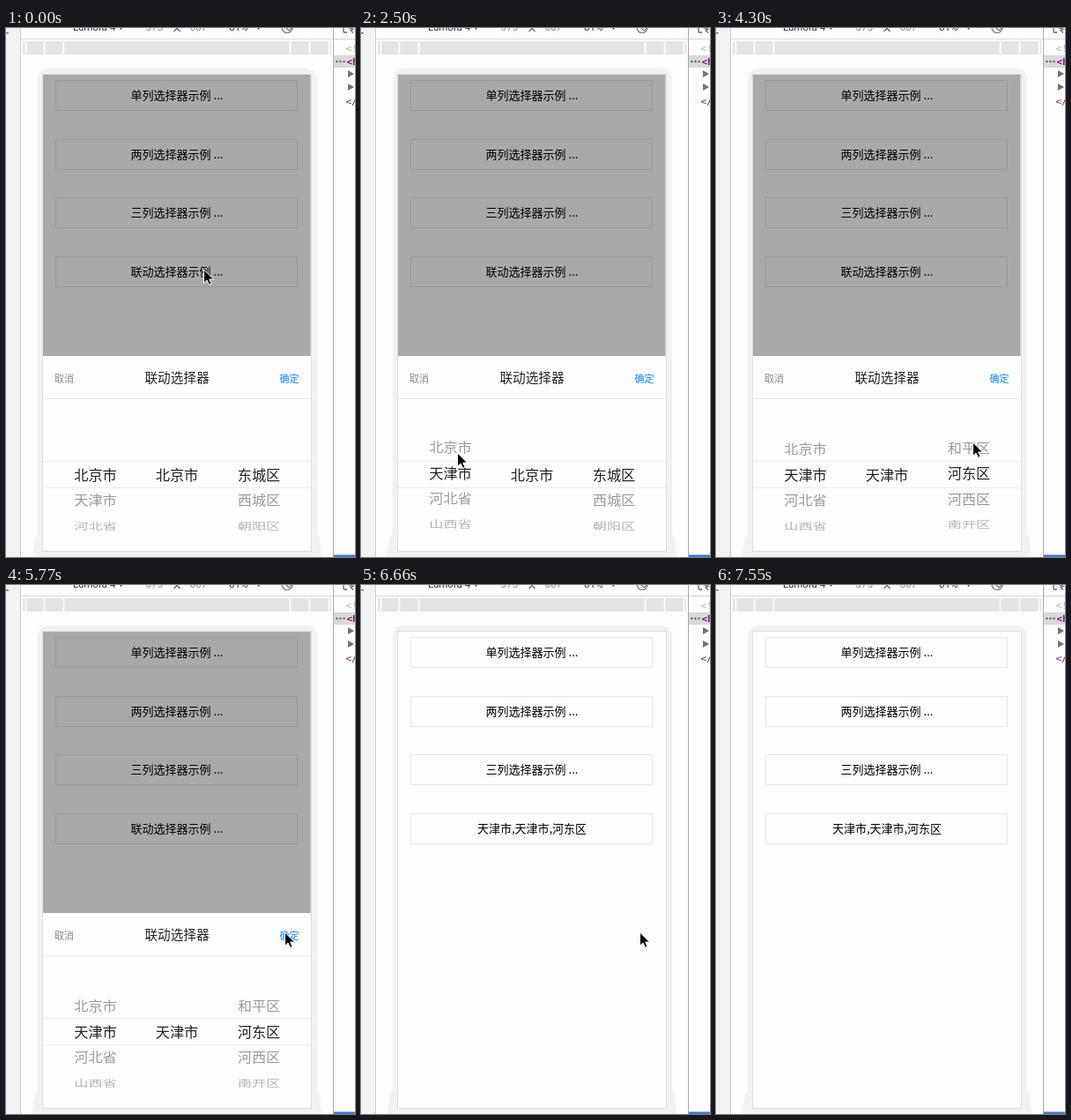
An HTML page for the animation above (8000 ms loop, 396x600 px).

```html
<!DOCTYPE html>
<html lang="zh">
<head>
<meta charset="utf-8">
<title>Linked picker</title>
<style>
  html, body { margin: 0; width: 100%; height: 100%; overflow: hidden; background: #fdfdfd; }
  svg { display: block; font-family: "Noto Sans CJK SC", "Noto Sans CJK", sans-serif; }
  .mid { text-anchor: middle; }
  .label { font-size: 13px; fill: #000; }
  .small { font-size: 11px; }
  .item { font-size: 16.2px; }
  .bar { font: 11.5px Roboto, "Open Sans", sans-serif; fill: #333; }
  .code { font: 11px "DejaVu Sans Mono", monospace; }
</style>
</head>
<body>
<svg id="stage" width="396" height="600" viewBox="0 0 396 600">
  <clipPath id="screen"><rect x="42" y="53" width="304" height="540"/></clipPath>
  <rect width="396" height="600" fill="#fdfdfd"/>

  <!-- browser tool bar and side panels -->
  <rect width="16" height="600" fill="#f1f3f3"/>
  <rect x="16" width="1" height="600" fill="#c8c8c8"/>
  <rect y="5" width="3" height="1.5" fill="#777"/>
  <rect x="17" y="12" width="354" height="1" fill="#dcdcdc"/>
  <g class="bar">
    <text x="76" y="3">Lumora 4</text>
    <path d="M128-2h5l-2.500 4z"/>
    <text x="158.500" y="3" fill="#888">375</text>
    <path d="M190.500-3l7 7m0-7l-7 7" stroke="#666" stroke-width="1.300"/>
    <text x="208.500" y="3" fill="#888">667</text>
    <text x="253" y="3">81%</text>
    <path d="M284-2h5l-2.500 4z"/>
    <g fill="none" stroke="#777" stroke-width="1.200">
      <circle cx="319" cy="-.5" r="6"/>
      <path d="M315-3l3-3 6 6-3 3z"/>
    </g>
  </g>
  <rect x="19" y="15" width="350" height="15" fill="#e4e4e4"/>
  <path d="M22.500 15v15M43.500 15v15M65.500 15v15M322.500 15v15M344.500 15v15M366.500 15v15" stroke="#fff" stroke-width="1.500"/>

  <!-- device -->
  <path d="M36 60q0-14 14-14H339q14 0 14 14V574l3 4 1 12 1 10H30l1-10 2-12 3-4z" fill="#f2f2f2"/>
  <rect x="41.500" y="52.500" width="305" height="541" fill="#fdfdfd" stroke="#dedede"/>
  <g id="buttons"></g>

  <g clip-path="url(#screen)">
    <rect id="mask" x="42" y="53" width="303.500" height="540" fill="#000006" fill-opacity=".335"/>
    <g id="sheet">
      <rect x="42" y="372" width="304" height="222" fill="#fdfdfd"/>
      <path d="M42 420.500h304M42 491.500h304M42 521.500h304" stroke="#ededed"/>
      <text class="small" x="55" y="402" fill="#888">取消</text>
      <text class="mid" x="194" y="402" font-size="14.600" fill="#222">联动选择器</text>
      <text class="small" x="310.500" y="402" fill="#0a84ff">确定</text>
      <g id="wheels"></g>
    </g>
  </g>

  <!-- markup panel -->
  <rect x="371" width="1" height="600" fill="#ababab"/>
  <rect x="372" y="12" width="24" height="1" fill="#d4d4d4"/>
  <path d="M383 0v4q0 1 1 1h3M387-1l7 2.500-3 1 3 3" fill="none" stroke="#666" stroke-width="1.300"/>
  <rect x="372" y="31" width="24" height="14" fill="#dadada"/>
  <g class="code">
    <text x="385.500" y="27" fill="#b0b0b0">&lt;!</text>
    <g fill="#666"><circle cx="375.500" cy="38" r="1.200"/><circle cx="379.500" cy="38" r="1.200"/><circle cx="383.500" cy="38" r="1.200"/></g>
    <text x="386.500" y="42" fill="#881280" font-weight="bold">&lt;h</text>
    <path d="M388 48l7 4-7 4zM388 63l7 4-7 4z" fill="#727272"/>
    <text x="385.500" y="87" fill="#881280">&lt;/</text>
  </g>
  <rect x="372" y="597.500" width="24" height="2.500" fill="#3f78cf"/>

  <path id="cursor" d="M0 0V15.200L3.500 12 6 17.300 8.600 16.200 6.200 11H11z" fill="#000" stroke="#fff" stroke-width="1"/>
</svg>
<script>
const LOOP = 8000, STEP = 148, ROW = 29, TILT = 25 * Math.PI / 180;
const $ = id => document.getElementById(id);

function add(parent, name, attrs, text = '') {
  const node = document.createElementNS(parent.namespaceURI, name);
  for (const key in attrs) node.setAttribute(key, attrs[key]);
  node.textContent = text;
  return parent.appendChild(node);
}

// Keys are [step, ...values], eased between neighbours.
function sample(keys, step) {
  const next = keys.findIndex(key => key[0] > step);
  if (next < 0) return keys[keys.length - 1].slice(1);
  const from = keys[next - 1], to = keys[next];
  const p = (step - from[0]) / (to[0] - from[0]);
  const eased = p * p * (3 - 2 * p);
  return from.slice(1).map((v, i) => v + (to[i + 1] - v) * eased);
}

const cursorPath = [
  [0, 224.5, 274], [8, 102.5, 526], [11, 102.5, 526], [12, 104, 522], [15, 108, 486],
  [17, 109.5, 482], [19, 120, 484], [26, 283, 552], [27, 283, 552], [28, 286, 520],
  [29, 291.5, 470], [30, 292.5, 467], [34, 292.5, 467], [39, 316.5, 394], [46, 316.5, 394], [51, 402, 352]
];
const provinceTurn = [[0, 0], [12, 0], [15, 1.18], [16, 1.18], [17, 1.08], [18, 1]];
const districtTurn = [[0, 0], [27, 0], [28, 0.6], [29, 1.05], [30, 1.04], [32, 1]];

const provinces = ['北京市', '天津市', '河北省', '山西省', '内蒙古'];
const beijing = ['东城区', '西城区', '朝阳区', '丰台区'];
const tianjin = ['和平区', '河东区', '河西区', '南开区', '河北区'];

const labels = ['单列选择器示例 ...', '两列选择器示例 ...', '三列选择器示例 ...', ''].map((text, i) => {
  const y = 59.5 + Math.round(i * 66.5);
  add($('buttons'), 'rect', { x: 56.5, y, width: 274, height: 34, fill: 'none', stroke: '#e7e7e7' });
  return add($('buttons'), 'text', { x: 194, y: y + 21.5, class: 'mid label' }, text);
});

const wheels = [101.5, 194, 287].map(x => ({
  x, rows: provinces.map(() => add($('wheels'), 'text', { class: 'mid item' }))
}));

function turnWheel({ x, rows }, names, turn) {
  rows.forEach((row, i) => {
    const offset = i - turn, far = Math.abs(offset);
    const visible = i < names.length && far < 2.6;
    row.setAttribute('visibility', visible ? 'inherit' : 'hidden');
    if (!visible) return;
    row.textContent = names[i];
    row.setAttribute('fill', far < 0.5 ? '#222' : far < 1.5 ? '#999' : '#b2b2b2');
    row.setAttribute('opacity', Math.min(1, (2.6 - far) / 0.6));
    row.setAttribute('transform',
      `translate(${x} ${506.8 + offset * ROW}) scale(1 ${Math.cos(offset * TILT)}) translate(0 6.1)`);
  });
}

function draw(time) {
  const step = Math.floor((time % LOOP + 18) / STEP);
  const linked = step >= 20;
  turnWheel(wheels[0], provinces, sample(provinceTurn, step)[0]);
  turnWheel(wheels[1], [linked ? '天津市' : '北京市'], 0);
  turnWheel(wheels[2], linked ? tianjin : beijing, sample(districtTurn, step)[0]);

  const [hidden] = sample([[0, 0], [43, 0], [45, 1]], step);
  $('mask').setAttribute('opacity', 1 - hidden);
  $('sheet').setAttribute('transform', `translate(0 ${hidden * 222})`);
  labels[3].textContent = step >= 44 ? '天津市,天津市,河东区' : '联动选择器示例 ...';
  $('cursor').setAttribute('transform', `translate(${sample(cursorPath, step).join(' ')})`);
}

function tick() {
  draw(performance.now());
  requestAnimationFrame(tick);
}
tick();
</script>
</body>
</html>
```
